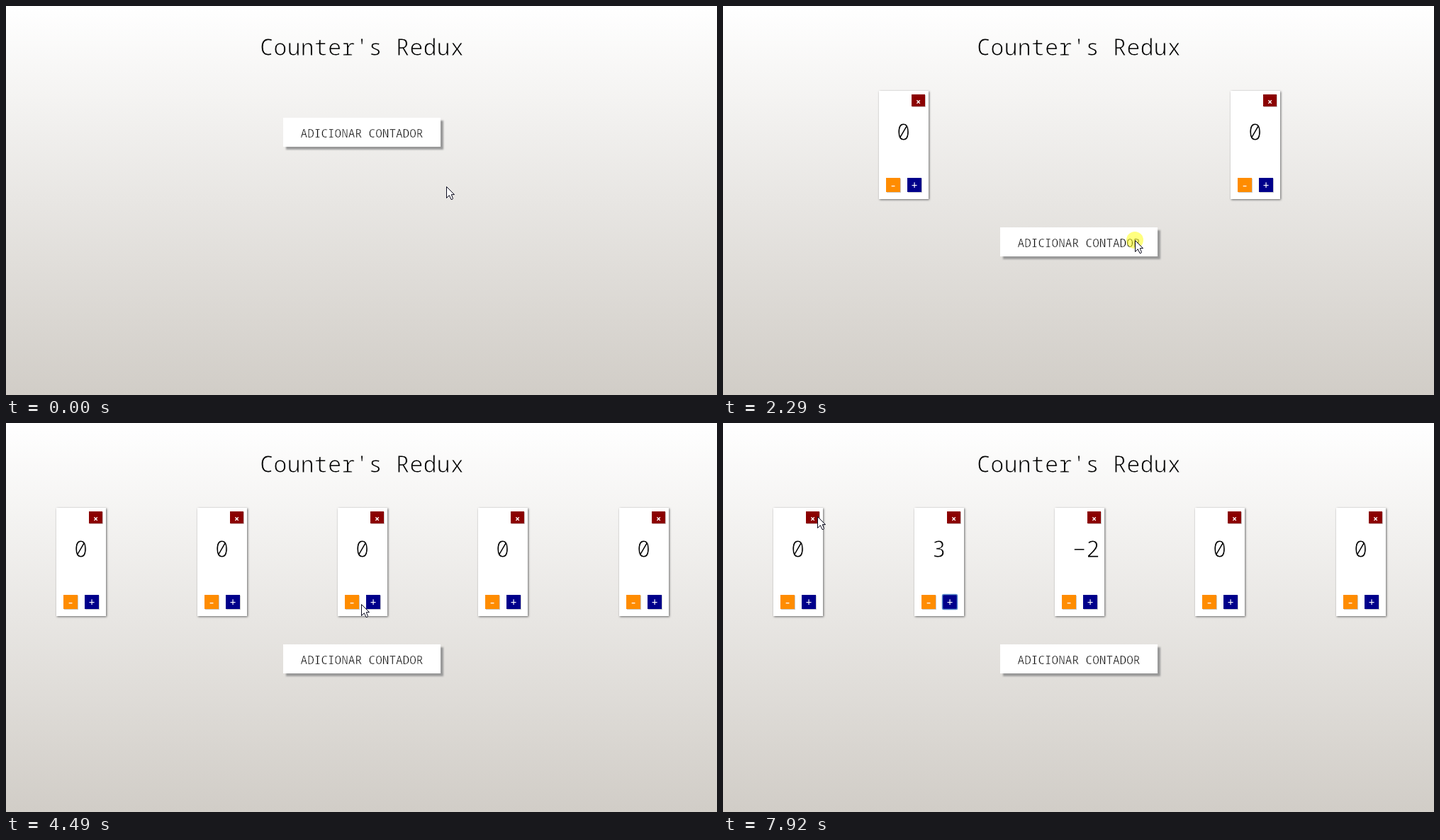
Animation of 1003x550 px, one loop 8 s. Source, as an HTML page:

```html
<!DOCTYPE html>
<html lang="pt">
<head>
<meta charset="utf-8">
<title>Counter's Redux</title>
<style>
  html, body { margin: 0; width: 100%; height: 100%; overflow: hidden; }
  body { background: linear-gradient(#fff, #d1cdc7); }
  svg { display: block; width: 1003px; height: 550px; }
  /* a pale outline over the fill makes the strokes light */
  text {
    font: 300 16px "Noto Sans Mono", "DejaVu Sans Mono", monospace;
    stroke: #fff; stroke-width: .45; white-space: pre;
  }
  .big { font-size: 32px; stroke-width: 1; }
  .title { stroke: #f9f9f8; }
  .sign { font-weight: 500; fill: #fff; stroke: none; text-anchor: middle; }
  .cross { font-size: 12px; font-weight: 700; }
  .panel { fill: #fff; filter: drop-shadow(1.5px 1.5px 1.5px #666); }
  .add { fill: #fff; filter: drop-shadow(4px 4px 1px #999); }
  .key { filter: drop-shadow(1px 1px .5px #ccc); }
  .ring { fill: none; stroke: #5b8bc9; stroke-width: 1.5; }
</style>
</head>
<body>
<svg viewBox="0 0 1003 550">
  <text class="big title" x="358" y="69.5">Counter's Redux</text>
  <g id="cards"></g>
  <g id="add">
    <rect class="add" x="391" y="158" width="222" height="41"/>
    <text x="415.6" y="185.5">ADICIONAR CONTADOR</text>
  </g>
  <g id="cursor">
    <circle id="glow" r="12" fill="#ff0" fill-opacity=".5"/>
    <path d="M.5 .5V16.5L4.3 12.7L7 18.5H8.6L9.4 17L7.3 11.6H11.5Z" fill="#fff" stroke="#0a0a1e"/>
  </g>
</svg>
<script>
const LOOP = 8000, STEP = 80, HOLD = 80;
const $ = id => document.getElementById(id);

// Mouse path: start, end, x, y
const moves = [
  [0, 0, 621, 255],
  [80, 640, 579, 193],
  [1190, 1590, 582, 321],
  [2060, 2140, 581, 331],
  [3610, 4330, 509, 256],
  [4410, 4970, 493, 255],
  [5610, 5930, 360, 251],
  [5930, 6330, 327, 251],
  [7200, 7680, 85, 150],
  [7680, 8000, 133, 132]
];
const clicks = {
  add: [720, 1670, 2290, 2760, 3460],
  minus: [4970, 5290],
  plus: [6330, 6570, 6810]
};

const count = (name, t) => clicks[name].filter(c => t >= c + HOLD).length;

function cursorAt(t) {
  let x = 0, y = 0;
  for (const [start, end, toX, toY] of moves) {
    if (t < start) break;
    // the pointer advances once per step and slows towards the end
    const k = t >= end ? 1 : (Math.floor((t - start) / STEP) + 1) * STEP / (end - start);
    const ease = 1 - (1 - k) ** 2;
    x += (toX - x) * ease;
    y += (toY - y) * ease;
  }
  return [Math.round(x), Math.round(y)];
}

const key = (x, y, w, h, color, sign, base, extra = "") =>
  `<rect class="key" x="${x}" y="${y}" width="${w}" height="${h}" fill="${color}"/>
   <text class="sign ${extra}" x="${x + w / 2}" y="${base}">${sign}</text>`;

const ring = x => `<rect class="ring" x="${x - .5}" y="242.5" width="21" height="21" rx="2"/>`;

function card(x, value, focus) {
  return `<g transform="translate(${x} 0)">
    <rect class="panel" y="120" width="70" height="153"/>
    ${key(46, 125, 19, 17, "#8b0000", "×", 139.5, "cross")}
    <text class="big" x="25" y="189.5">${String(value).replace("-", "−")}</text>
    ${key(10, 243, 20, 20, "#ff8c00", "-", 258.5)}
    ${key(40, 243, 20, 20, "#00008b", "+", 259)}
    ${focus ? ring(focus === "plus" ? 40 : 10) : ""}
  </g>`;
}

let shown = "";
function draw(t) {
  const n = count("add", t);
  const plusFocus = t >= clicks.plus[0];
  const minusFocus = t >= clicks.minus[0] && !plusFocus;
  let html = "";
  for (let i = 0; i < n; i++) {
    const x = Math.round(468 + (i - (n - 1) / 2) * 992.4 / n);
    if (i === 1) html += card(x, count("plus", t), plusFocus && "plus");
    else if (i === 2) html += card(x, -count("minus", t), minusFocus && "minus");
    else html += card(x, 0);
  }
  if (html !== shown) $("cards").innerHTML = shown = html;
  $("add").setAttribute("transform", `translate(0 ${n ? 155 : 0})`);
  $("cursor").setAttribute("transform", `translate(${cursorAt(t)})`);
  const down = Object.values(clicks).flat().some(c => t >= c && t < c + HOLD);
  $("glow").setAttribute("visibility", down ? "visible" : "hidden");
}

const begin = performance.now();
function tick() {
  draw((performance.now() - begin) % LOOP);
  requestAnimationFrame(tick);
}
tick();
</script>
</body>
</html>
```
